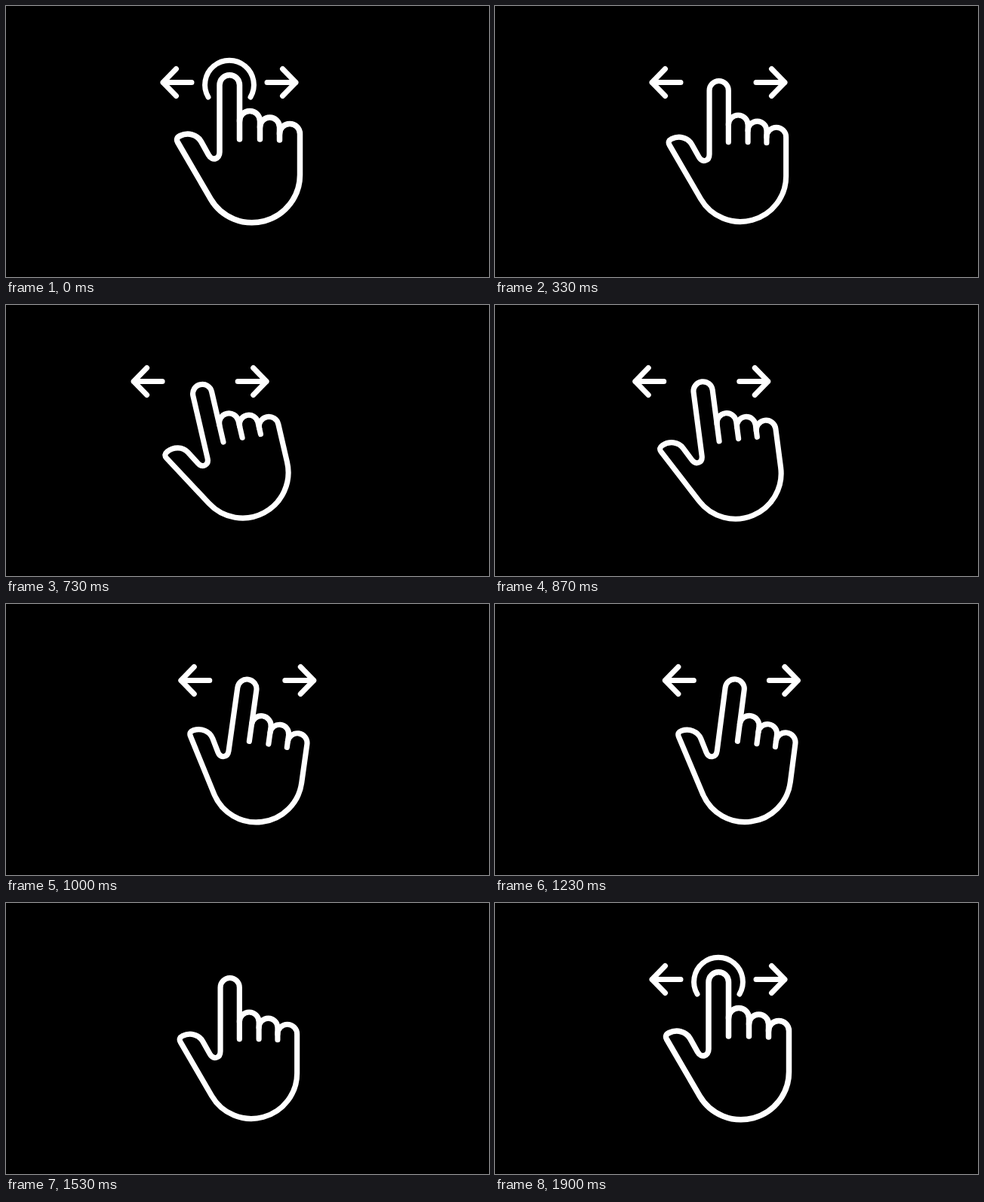
Animation of 640x360 px, one loop 2010 ms. Source, as an HTML page:

```html
<!DOCTYPE html>
<html lang="en">
<head>
<meta charset="utf-8">
<title>Swipe gesture</title>
<style>
  html, body { margin: 0; width: 100%; height: 100%; overflow: hidden; background: #000; }
  svg { display: block; width: 100%; height: 100%; }
  path { fill: none; stroke: #fff; stroke-width: 7; stroke-linecap: round; stroke-linejoin: round; }
  #hand path { stroke-width: 7.5; }
</style>
</head>
<body>
<svg viewBox="0 0 640 360">
  <path id="ring" d="M268 121A32.4 32.4 0 1 1 324 121"/>
  <g id="arrows">
    <path d="M225.5 83.5L208 101.5L225.5 119.5M208 101.5H246"/>
    <path d="M366.5 83.5L384 101.5L366.5 119.5M384 101.5H346"/>
  </g>
  <g id="hand">
    <path d="M309.5 177V105A13.25 13.25 0 0 0 283 105V194C283 204 273 206 268.5 198L258.5 180
      C253 170.5 241 167.5 230.5 172.5Q224.5 175.5 227.5 181L271 256A63.5 63.5 0 0 0 389.5 224
      V170A13.5 13.5 0 0 0 362.5 170"/>
    <path d="M309.5 153A13.5 13.5 0 0 1 336.5 153V177"/>
    <path d="M336.5 161A13 13 0 0 1 362.5 161V178"/>
  </g>
</svg>
<script>
const LOOP = 2010, REACH = 40, TILT = 13.4;
const [ring, arrows, hand] = ["ring", "arrows", "hand"].map(id => document.getElementById(id));

// Progress from 0 to 1 between two times, linear or eased at both ends
const linear = (t, from, to) => Math.min(1, Math.max(0, (t - from) / (to - from)));
const ease = (t, from, to) => (1 - Math.cos(Math.PI * linear(t, from, to))) / 2;

// Left, then right; the way back is added by each part
const swing = t => -ease(t, 433, 767) + 2 * ease(t, 767, 1100);

function draw(t) {
  const press = 1 - ease(t, 0, 300) + ease(t, 1600, 1900);
  const angle = TILT * (swing(t) - ease(t, 1100, 1380));
  const shift = t < 1600 ? REACH * (swing(t) - 2 * ease(t, 1100, 1467)) : 0;

  hand.setAttribute("transform",
    `rotate(${angle} 304 275) translate(306 260) scale(${0.954 + 0.046 * press}) translate(-306 -260)`);
  arrows.setAttribute("transform", `translate(${shift})`);
  arrows.setAttribute("opacity", 1 - linear(t, 1240, 1320) + ease(t, 1600, 1900));
  ring.setAttribute("opacity", press);
}

const start = performance.now();
function tick() {
  draw((performance.now() - start) % LOOP);
  requestAnimationFrame(tick);
}
tick();
</script>
</body>
</html>
```
